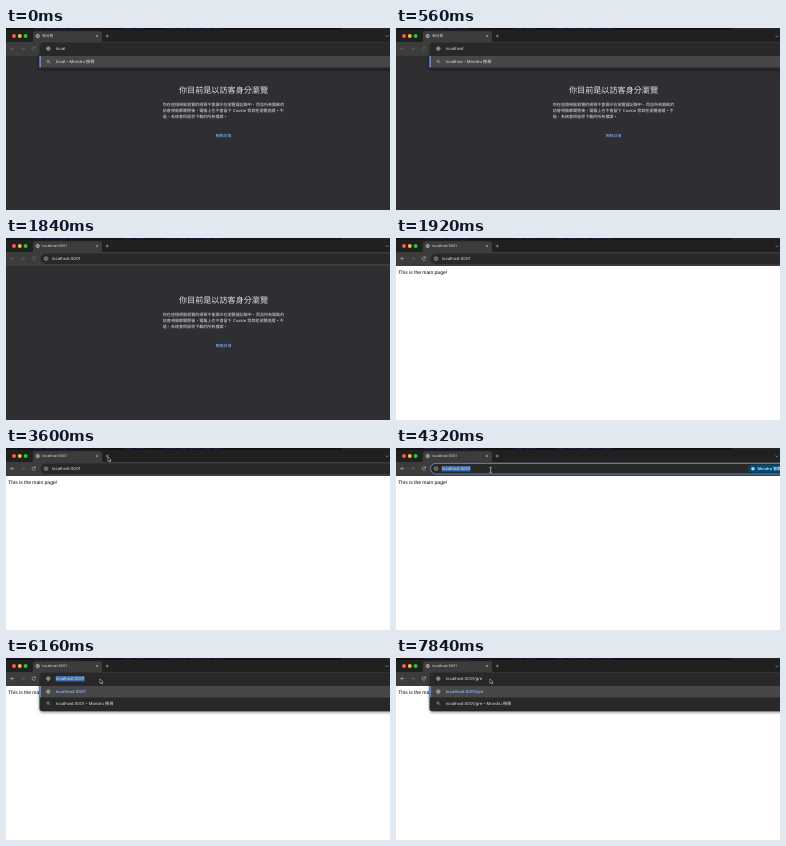
These frames come from a looping animation (384x182 px, 8 s). An HTML page:

```html
<!DOCTYPE html>
<html lang="zh-Hant">
<head>
<meta charset="utf-8">
<title>Address bar</title>
<style>
  html, body { margin: 0; width: 100%; height: 100%; overflow: hidden; background: #202020; }
  svg { display: block; width: 384px; height: 182px; }
  text { font-family: Inter, "Noto Sans CJK TC", "Noto Sans CJK", sans-serif; font-size: 4.15px; fill: #e3e3e3;
         white-space: pre; text-rendering: geometricPrecision; }
  .line { fill: none; stroke: #c7c7c7; stroke-width: .5; }
  .url { font-weight: 600; fill: #8fb2f5; }
  #list { filter: drop-shadow(0 1.5px 1.5px rgba(0, 0, 0, .5)); }
</style>
</head>
<body>
<svg viewBox="0 0 384 182">
  <defs>
    <g id="globe" class="line"><circle r="1.8"/><path d="M-1.8 0H1.8M0-1.8Q-1.6 0 0 1.8Q1.6 0 0-1.8"/></g>
    <g id="search" class="line"><circle cx="-.3" cy="-.3" r="1.1"/><path d="M.5 .5L1.7 1.7"/></g>
    <g id="info"><circle r="2.7" fill="#3c3c3c"/><circle r="1.6" class="line"/><path class="line" d="M0-.2V.9M0-.9V-.6"/></g>
  </defs>

  <rect width="384" height="182" fill="#202020"/>
  <rect width="384" height="1.7" fill="#111118"/>
  <path d="M28 .6H76M118 .6H140M160 .6H216" stroke="#272650" stroke-width=".7" stroke-dasharray="9 3"/>
  <path d="M336 .9H384" stroke="#4a4a4e" stroke-width=".6"/>

  <circle cx="8" cy="8" r="1.9" fill="#ff5f57"/>
  <circle cx="13.8" cy="8" r="1.9" fill="#febc2e"/>
  <circle cx="19.6" cy="8" r="1.9" fill="#28c840"/>
  <path d="M25 14.2Q27 14 27 12V5.5Q27 3.3 29.2 3.3H93.8Q96 3.3 96 5.5V12Q96 14 98 14.2Z" fill="#3c3c3c"/>
  <use href="#globe" x="31.7" y="8"/>
  <text id="tab" x="36.3" y="9.4" style="font-size:3.6px"></text>
  <path class="line" d="M89.9 6.9L92.1 9.1M92.1 6.9L89.9 9.1M99.7 8H102.7M101.2 6.5V9.5"/>
  <path class="line" d="M379.6 7.5L381 8.9L382.4 7.5"/>

  <rect y="14" width="384" height="14" fill="#3c3c3c"/>
  <path id="back" class="line" d="M8.3 20.6H4.8M6.5 18.9L4.8 20.6L6.5 22.3"/>
  <path class="line" style="stroke:#707070" d="M15.2 20.6H18.7M17 18.9L18.7 20.6L17 22.3"/>
  <path id="reload" class="line" d="M29.2 19.6A1.7 1.7 0 1 0 29.4 21.2M29.5 18.5V19.9H28.1"/>

  <g id="guest">
    <rect y="28" width="384" height="154" fill="#2f2e33"/>
    <text x="217.5" y="65.2" text-anchor="middle" style="font-size:8.1px">你目前是以訪客身分瀏覽</text>
    <g id="note"></g>
    <text x="217.5" y="108.7" text-anchor="middle" style="font-size:3.9px;fill:#8ab4f8">瞭解詳情</text>
  </g>
  <g id="main">
    <rect y="28" width="384" height="154" fill="#fff"/>
    <text x="2.2" y="35.5" style="font:5px 'Liberation Sans',Arial,sans-serif;fill:#000">This is the main page!</text>
  </g>

  <g id="pill">
    <rect id="field" x="34.5" y="15.4" width="370" height="10.6" rx="5.3"/>
    <use id="info-icon" href="#info" x="40" y="20.6"/>
  </g>
  <g id="chip">
    <rect x="352.5" y="16.6" width="50" height="8.2" rx="4.1" fill="#004a77"/>
    <circle cx="357" cy="20.7" r="1.8" fill="#a8d4f5"/>
    <text x="361.5" y="22.1" style="font-size:3.9px;font-weight:600;fill:#c2e7ff">Mondru 智慧鏡頭</text>
  </g>

  <g id="list">
    <rect id="panel" x="33.5" y="24" width="370" rx="3" fill="#282828"/>
    <rect x="33.5" y="28" width="370" height="11.4" fill="#474747"/>
    <rect x="33.5" y="28" width="1.2" height="11.4" fill="#7ea6f2"/>
    <use id="icon1" x="42.3" y="33.6"/>
    <text id="row1" x="50" y="35"></text>
    <use id="icon2" href="#search" x="42.3" y="45.2"/>
    <text id="row2" x="50" y="46.6"></text>
  </g>
  <g id="head">
    <path d="M33.5 28V17.5Q33.5 14.6 36.5 14.6H384V28Z" fill="#282828"/>
    <use href="#globe" x="42.3" y="20.6"/>
  </g>

  <rect id="mark" y="18" height="5.4" fill="#3f6ca8"/>
  <text id="address" y="22"></text>
  <path id="arrow" d="M0 0V4.4L1.1 3.5L1.8 5L2.5 4.7L1.8 3.2L3.2 3.1Z" fill="#000" stroke="#fff" stroke-width=".45"/>
  <path id="beam" d="M93.4 19.3Q94.6 19.3 94.6 20Q94.6 19.3 95.8 19.3M94.6 20V24M93.4 24.7Q94.6 24.7 94.6 24Q94.6 24.7 95.8 24.7"
        fill="none" stroke="#e8e8e8" stroke-width=".6"/>
</svg>
<script>
const LOOP = 8000;
const HOST = 'localhost:5001';
const $ = id => document.getElementById(id);
const show = (id, on) => { $(id).style.display = on ? '' : 'none'; };
const set = (id, attrs) => { for (const k in attrs) $(id).setAttribute(k, attrs[k]); };

['你在這個視窗瀏覽的網頁不會顯示在瀏覽器記錄中，而且所有開啟的',
 '訪客視窗都關閉後，電腦上也不會留下 Cookie 等其他瀏覽追蹤。不',
 '過，系統會保留你下載的所有檔案。'].forEach((words, i) => {
  const line = document.createElementNS('http://www.w3.org/2000/svg', 'text');
  line.textContent = words;
  line.setAttribute('x', 156.8);
  line.setAttribute('y', 78.3 + i * 6);
  line.style.fontSize = '4.05px';
  $('note').append(line);
});

// Each step changes only the listed parts of the state.
const steps = [
  [0, { page: 'guest', tab: '新分頁', text: 'local', hint: 'local', list: 1, url: '', edit: true,
        marked: false, focus: false, hover: false, chip: false, pointer: null }],
  [80, { text: 'localh' }], [160, { hint: 'localh' }],
  [240, { text: 'localho' }], [320, { hint: 'localho' }],
  [400, { text: 'localhos' }], [480, { hint: 'localhos' }],
  [560, { text: 'localhost' }], [640, { hint: 'localhost', url: 'localhost' }],
  ...[[800, 10], [960, 11], [1040, 12], [1120, 13], [1280, 14]].map(([at, n]) => typed(at, HOST.slice(0, n))),
  [1840, { edit: false, list: 0, tab: HOST }],
  [1920, { page: 'main' }],
  [3600, { pointer: [102, 9] }],
  [3680, { pointer: [97, 16], hover: true }],
  [3760, { pointer: [93.6, 19.6] }],
  [3920, { pointer: 'beam' }],
  [4080, { focus: true, hover: false }],
  [4160, { marked: true }],
  [4320, { chip: true }],
  [5040, { text: '/', marked: false }],
  [5120, { chip: false, focus: false, edit: true, hint: '/', url: 'file:///', pointer: [94, 21] }],
  [5200, { list: .2 }], [5280, { list: .4 }], [5360, { list: .6 }], [5440, { list: .78 }], [5520, { list: 1 }],
  [6160, { text: HOST, hint: HOST, url: HOST, marked: true }],
  [6640, { marked: false }],
  ...[[7360, 1], [7600, 2], [7760, 3], [7840, 4]].map(([at, n]) => typed(at, HOST + '/gre'.slice(0, n)))
];

function typed(at, words) {
  return [at, { text: words, hint: words, url: words }];
}

function stateAt(time) {
  return Object.assign({}, ...steps.filter(([at]) => at <= time).map(([, part]) => part));
}

function render(s) {
  const guest = s.page === 'guest';
  const query = `${s.hint} – Mondru 搜尋`;
  show('guest', guest);
  show('main', !guest);
  $('tab').textContent = s.tab;
  $('back').style.stroke = guest ? '#707070' : '#d0d0d0';
  $('reload').style.stroke = guest ? '#707070' : '#d0d0d0';

  show('pill', !s.edit);
  show('head', s.edit);
  set('field', { fill: s.hover ? '#353535' : '#282828', stroke: s.focus ? '#6f97d8' : 'none', 'stroke-width': .8 });
  show('chip', s.chip);

  show('list', s.list > 0);
  $('list').style.opacity = s.list;
  set('panel', { height: s.url ? 29.2 : 17 });
  set('icon1', { href: s.url ? '#globe' : '#search' });
  $('row1').textContent = s.url || query;
  $('row1').setAttribute('class', s.url ? 'url' : '');
  $('row2').textContent = query;
  show('row2', s.url);
  show('icon2', s.url);

  const x = s.edit ? 50 : 46;
  $('address').textContent = s.text;
  set('address', { x });
  show('mark', s.marked);
  set('mark', { x: x - .3, width: $('address').getComputedTextLength() + .6 });

  const arrow = Array.isArray(s.pointer);
  show('arrow', arrow);
  show('beam', s.pointer === 'beam');
  if (arrow) set('arrow', { transform: `translate(${s.pointer})` });
}

const start = performance.now();
function frame() {
  render(stateAt((performance.now() - start) % LOOP));
  requestAnimationFrame(frame);
}
frame();
</script>
</body>
</html>
```
